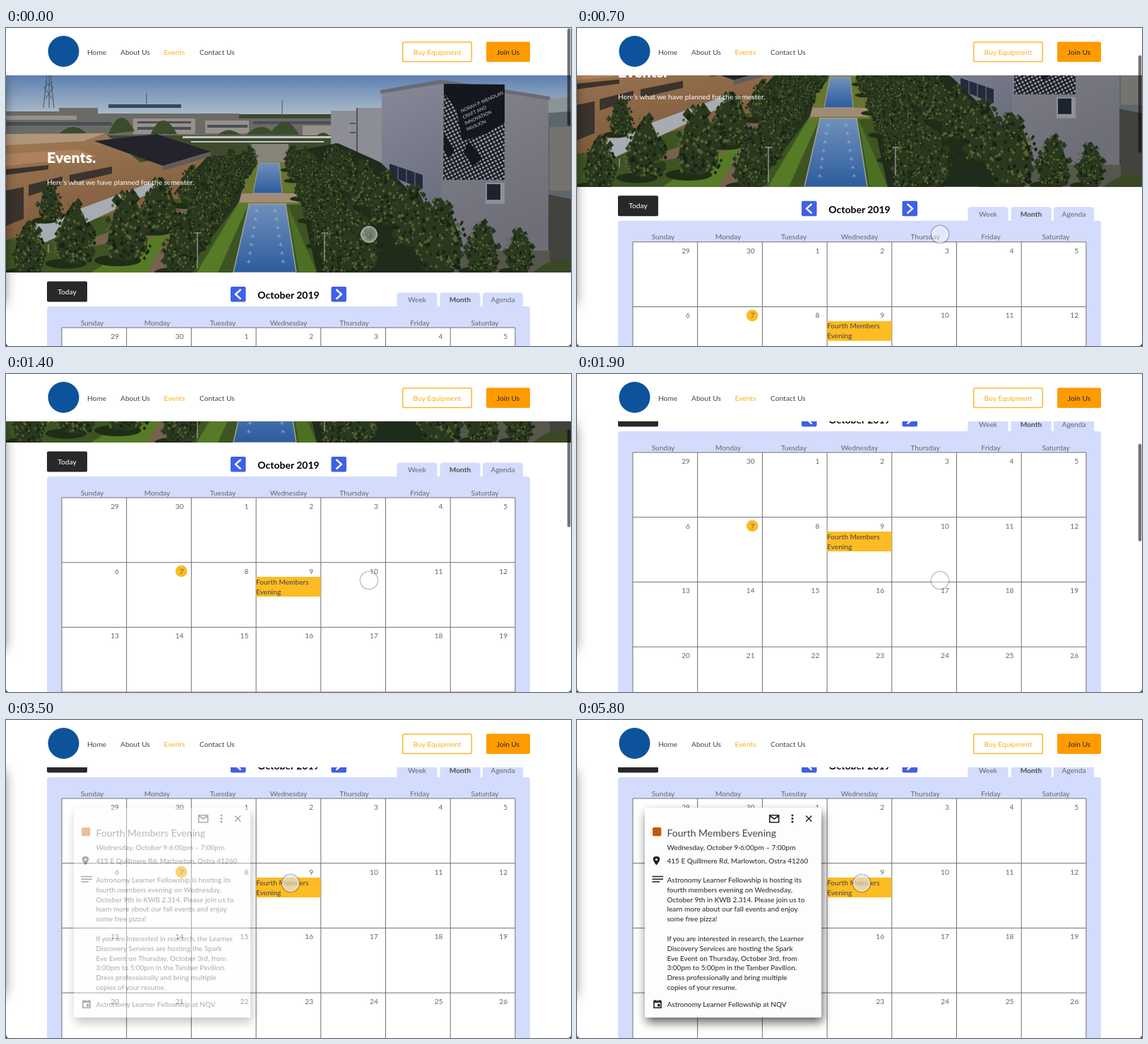
Write an HTML page that moves like this. It is 800 px wide and 450 px high and loops after 5.9 s.

```html
<!DOCTYPE html>
<html lang="en">
<head>
<meta charset="utf-8">
<title>Events</title>
<style>
  @property --scroll { syntax: "<number>"; inherits: true; initial-value: 0; }

  html, body { margin: 0; width: 100%; height: 100%; overflow: hidden; background: #fff; }
  svg { display: block; width: 800px; height: 450px; }
  text { font: 10.2px Lato, "Open Sans", sans-serif; fill: #444; white-space: pre; }
  .mid { text-anchor: middle; }
  .end { text-anchor: end; fill: #666; }
  .grey { fill: #666; }
  .white { fill: #fff; }
  .gold { fill: #fdae1c; }
  .bold { font-weight: 700; fill: #505050; }
  .hero { font-size: 21.3px; font-weight: 900; fill: #fff; }
  .month { font-size: 14px; font-weight: 700; fill: #000; }
  .title { font-size: 14px; }
  .body text:not(.title) { font-size: 10px; font-weight: 500; fill: #333; }
  .sign text { font-size: 6.6px; fill: #c9ccd2; }
  .icon { fill: none; stroke: #222; stroke-width: 1.6; }
  .chevron { fill: none; stroke: #fff; stroke-width: 2.4; }

  /* Every segment advances in 100 ms steps. */
  #stage { animation: scroll 5.9s infinite; }
  #page { transform: translateY(calc(var(--scroll) * -1px)); }
  #bar { transform: translateY(calc(var(--scroll) * .314px)); animation: bar 5.9s infinite; }
  #cursor { animation: move 5.9s step-end infinite; }
  #press { animation: press 5.9s step-end infinite; }
  #popup { animation: appear 5.9s step-end infinite; }

  @keyframes scroll {
    0% { --scroll: 0; animation-timing-function: steps(4, end); }
    6.779% { --scroll: 71; animation-timing-function: steps(5, end); }
    15.254% { --scroll: 154.7; animation-timing-function: steps(5, end); }
    23.728% { --scroll: 249; animation-timing-function: steps(4, end); }
    30.508% { --scroll: 308; animation-timing-function: step-end; }
    32.203%, 100% { --scroll: 313; }
  }
  @keyframes bar {
    0% { opacity: .55; animation-timing-function: step-end; }
    52.54% { opacity: .55; animation-timing-function: steps(3, end); }
    57.62%, 100% { opacity: 0; }
  }
  @keyframes move {
    0% { transform: translate(514px, 292px); }
    35.59% { transform: translate(500px, 284px); }
    37.28% { transform: translate(465px, 265px); }
    38.98% { transform: translate(425px, 243px); }
    40.67% { transform: translate(406px, 233px); }
    42.37%, 100% { transform: translate(403px, 231px); }
  }
  @keyframes press {
    0% { opacity: 0; }
    42.37%, 100% { opacity: .5; }
  }
  @keyframes appear {
    0% { opacity: 0; }
    59.32% { opacity: .38; }
    61.01% { opacity: .8; }
    62.71%, 100% { opacity: 1; }
  }

  #card { filter: drop-shadow(2px 7px 7px rgba(0, 0, 0, .6)); }
  #drawer { filter: drop-shadow(0 0 9px rgba(0, 0, 0, .6)); }
</style>
</head>
<body>
<svg id="stage" viewBox="0 0 800 450">
  <defs>
    <linearGradient id="sky" x2="0" y2="1">
      <stop stop-color="#5d80b2"/><stop offset="1" stop-color="#b3c1c9"/>
    </linearGradient>
    <linearGradient id="pool" x2="0" y2="1">
      <stop stop-color="#6f90ba"/><stop offset="1" stop-color="#2c5c9e"/>
    </linearGradient>
    <linearGradient id="wall" x2=".3" y2="1">
      <stop stop-color="#85858f"/><stop offset="1" stop-color="#6d6e78"/>
    </linearGradient>
    <linearGradient id="side" x2=".2" y2="1">
      <stop stop-color="#888a98"/><stop offset="1" stop-color="#666a7a"/>
    </linearGradient>
    <linearGradient id="brick" x2=".3" y2="1">
      <stop stop-color="#a07a56"/><stop offset="1" stop-color="#785638"/>
    </linearGradient>
    <radialGradient id="glass">
      <stop stop-color="#fff" stop-opacity=".3"/><stop offset=".6" stop-color="#fff" stop-opacity=".4"/>
      <stop offset=".84" stop-color="#fff" stop-opacity=".6"/>
      <stop offset=".88" stop-color="#000" stop-opacity=".3"/><stop offset="1" stop-color="#000" stop-opacity="0"/>
    </radialGradient>
    <pattern id="dots" width="5" height="5" patternUnits="userSpaceOnUse" patternTransform="rotate(-27)">
      <circle cx="2.5" cy="2.5" r="1.7" fill="#9a9fa8"/>
    </pattern>
    <clipPath id="frame"><rect y="67" width="800" height="279"/></clipPath>
  </defs>

  <rect width="800" height="450" fill="#fff"/>

  <g id="page">
    <g clip-path="url(#frame)">
      <rect y="67" width="800" height="60" fill="url(#sky)"/>
      <rect y="122" width="800" height="224" fill="#3f4a2c"/>
      <!-- skyline -->
      <path d="M53 113L58 67M68 113L63 67M56 100L67 84L55 76M65 100L54 84L66 76M61 67V113M391 124V102M199 107V92" fill="none" stroke="#46525f"/>
      <path d="M0 118H75V113H130V121H330V128H462V152H0Z" fill="#6a6b67"/>
      <path d="M145 108H248V113H145Z" fill="#34465c"/>
      <path d="M0 124H100V130H0ZM180 128H268V150H180ZM282 131H344V149H282ZM420 138H460V152H420Z" fill="#96918a"/>
      <path d="M0 133H150V138H0ZM186 132H262V135H186ZM186 140H262V144H186ZM285 137H342V141H285ZM350 132H460V136H350Z" fill="#484f55"/>
      <path d="M75 150Q95 130 115 150ZM145 150Q162 106 182 146ZM205 150Q222 112 242 150ZM300 151Q315 138 332 151ZM340 151Q360 132 376 146Q397 118 415 151ZM435 158Q450 138 462 158Z" fill="#3b4b2d"/>
      <!-- left buildings -->
      <path d="M0 152L140 149L190 190L285 176V230L60 300L0 320Z" fill="url(#brick)"/>
      <path d="M0 150L140 149L110 160L0 166Z" fill="#b0977a"/>
      <path d="M0 178L100 172L130 182L0 195Z" fill="#ad825c"/>
      <path d="M0 230L25 225V270L0 280ZM32 222L80 210V222L32 238ZM0 200L60 194V200L0 208ZM90 208L150 196V206L90 220Z" fill="#3b332d"/>
      <path d="M125 160L213 150L290 175L222 195Z" fill="#22232b"/>
      <path d="M222 195L290 175V182L222 202Z" fill="#625b55"/>
      <path d="M250 153H462V156H250ZM262 160H450V162H262Z" fill="#c3c7c8"/>
      <!-- lawns, paths and water -->
      <path d="M0 300L250 240L346 172H400L450 346H0Z" fill="#3d5422"/>
      <path d="M65 318L230 258L275 250L225 346H125L175 300Z" fill="#77624e"/>
      <path d="M120 346L190 305L235 285L200 346ZM205 280L250 262L270 266L235 290ZM300 346L345 246H330L270 346Z" fill="#567a26"/>
      <path d="M30 283L205 219L222 225L50 306Z" fill="#a7acb2"/>
      <path d="M60 306V318M105 285V300M150 264V285" stroke="#7c7d7c" stroke-width="2"/>
      <path d="M335 186H405L416 250H325Z" fill="#66752f"/>
      <path d="M345 164H400V190H345Z" fill="#858477"/>
      <path d="M328 234H412V247H328Z" fill="#a18b75"/>
      <path d="M358 191H387L391 234H350Z" fill="url(#pool)" stroke="#a5a093"/>
      <path d="M344 249H396L411 346H322Z" fill="url(#pool)" stroke="#a5a093" stroke-width="1.5"/>
      <path d="M398 249L440 346H415Z" fill="#4d6f24"/>
      <path id="spray" fill="none" stroke="#9db9d6" stroke-width=".8"/>
      <!-- right buildings -->
      <path d="M460 117H497V113H532V205H460Z" fill="#8d8e95"/>
      <path d="M497 113V190M487 135H495M487 148H495" stroke="#50535b" stroke-width="2"/>
      <path d="M740 100H800V346H740Z" fill="#5d666b"/>
      <path d="M740 104L800 97V118L740 122Z" fill="#8b9494"/>
      <path d="M770 140H800V230H770Z" fill="#75736f"/>
      <path d="M766 235L800 242V346H766Z" fill="#42423f"/>
      <path d="M532 88L616 75V320L532 245Z" fill="url(#side)"/>
      <path d="M616 75L768 99V318H616Z" fill="url(#wall)"/>
      <path d="M530 88L616 73L770 97V102L616 79L530 93Z" fill="#6a6a74"/>
      <path d="M543 192L590 208V228L543 209Z" fill="#222a3c"/>
      <path d="M555 196V214M567 200V219M579 204V224" stroke="#777a88"/>
      <path d="M620 79L706 80V215H619Z" fill="#14171e"/>
      <path d="M620 92L638 115L646 160L680 150L706 133V215H619Z" fill="url(#dots)"/>
      <path d="M655 160L675 185L661 195L648 177ZM620 150L635 172L628 184L620 172Z" fill="#14171e"/>
      <g class="sign" transform="translate(645 120) rotate(-24)">
        <text>NORAH P. WENDLAN</text>
        <text x="-1" y="9">CRAFT AND</text>
        <text x="-2" y="18">INNOVATION</text>
        <text x="-3" y="27">PAVILION</text>
      </g>
      <path d="M679 219H706V249H679Z" fill="#8f9097"/>
      <path d="M681 221H700V243H681Z" fill="#1b2230"/>
      <path d="M610 315H770V346H610Z" fill="#56564c"/>
      <path d="M715 324V315h4v9h4v-9h4v9h4v-9h4v9" fill="none" stroke="#8d8c8a"/>
      <!-- trees -->
      <path d="M402 175L470 163L530 190L600 258L622 346H440Z" fill="#1f2c1b"/>
      <path d="M348 178L285 182L240 230L268 262L262 335L330 246Z" fill="#26331e"/>
      <g id="trees"></g>
      <path d="M271 340V290M451 330V290M266 290H277M447 290H456" stroke="#a9a89f" stroke-width="1.2"/>
      <path d="M745 346Q780 320 800 330V346Z" fill="#3a4826"/>
    </g>
    <text class="hero" x="58" y="191">Events.</text>
    <text class="white" x="58" y="222">Here’s what we have planned for the semester.</text>

    <rect x="58" y="358.5" width="57" height="29" rx="2" fill="#282828"/>
    <text class="mid white" x="86.5" y="376.5">Today</text>
    <g fill="#3f60e8">
      <rect x="318" y="366" width="21.5" height="21.5" rx="2"/>
      <rect x="460.5" y="366" width="21.5" height="21.5" rx="2"/>
    </g>
    <path class="chevron" d="M332.5 370L325 376.8L332.5 383.5M467.5 370L475 376.8L467.5 383.5"/>
    <text class="mid month" x="400" y="383">October 2019</text>

    <g fill="#d3dcfd">
      <rect x="553.5" y="374.5" width="57" height="30" rx="4"/>
      <rect x="614.5" y="374.5" width="57" height="30" rx="4"/>
      <rect x="675" y="374.5" width="57" height="30" rx="4"/>
      <rect x="58" y="394" width="684" height="500" rx="4"/>
    </g>
    <text class="mid grey" x="582" y="388">Week</text>
    <text class="mid bold" x="643" y="388">Month</text>
    <text class="mid grey" x="703.5" y="388">Agenda</text>
    <g id="calendar"></g>
  </g>

  <rect width="800" height="67" fill="#fff"/>
  <circle cx="81.5" cy="33" r="22" fill="#0d539b"/>
  <text x="115" y="37.5">Home</text>
  <text x="162" y="37.5">About Us</text>
  <text class="gold" x="223.5" y="37.5">Events</text>
  <text x="274" y="37.5">Contact Us</text>
  <rect x="561.7" y="20" width="97.6" height="27.6" rx="2" fill="none" stroke="#fdb62f" stroke-width="1.5"/>
  <text class="mid gold" x="610.5" y="37.5">Buy Equipment</text>
  <rect x="680" y="19.5" width="62" height="28.6" rx="2" fill="#ff9b00"/>
  <text class="mid" x="711" y="37.5" style="fill:#222">Join Us</text>

  <rect id="drawer" x="-40" y="72" width="37" height="318"/>

  <g id="popup" class="body">
    <rect id="card" x="96" y="124" width="250" height="297" rx="2" fill="#fdfdfd"/>
    <g class="icon">
      <path d="M272.8 134.8H285.7V144.7H272.8ZM273 135.5L279.3 140L285.5 135.5"/>
      <path d="M324.3 135.5L332.3 143.5M332.3 135.5L324.3 143.5"/>
      <path d="M106.5 221.5H122M106.5 225.3H122M106.5 229H117"/>
      <path d="M109 397.7H119V407.2H109ZM109 399.5H119M111 396V398M117 396V398"/>
    </g>
    <g fill="#222">
      <circle cx="305" cy="135" r="1.5"/><circle cx="305" cy="139.5" r="1.5"/><circle cx="305" cy="144" r="1.5"/>
      <path d="M112.5 205.5C104.5 196 108 193 112.5 193S120.5 196 112.5 205.5Z"/>
      <rect x="114" y="402" width="3.5" height="3.5"/>
    </g>
    <circle cx="112.5" cy="197.5" r="1.6" fill="#fff"/>
    <rect x="107" y="152" width="12.3" height="12.3" rx="2" fill="#c25a08"/>
    <text class="title" x="127.5" y="164.5">Fourth Members Evening</text>
    <text x="127.5" y="184">Wednesday, October 9·6:00pm – 7:00pm</text>
    <text x="127.5" y="203">415 E Quillmere Rd, Marlowton, Ostra 41260</text>
    <g id="notes"></g>
    <text x="127.5" y="405.5">Astronomy Learner Fellowship at NQV</text>
  </g>

  <g id="cursor">
    <circle id="press" r="12" fill="#b9b7b0"/>
    <circle r="14" fill="url(#glass)"/>
  </g>
  <rect id="bar" x="794.8" y="0.5" width="4.5" height="138" rx="2.2"/>
  <path d="M0 445Q0 450 5 450H0ZM800 445Q800 450 795 450H800Z" fill="#333"/>
</svg>

<script>
  const $ = id => document.getElementById(id);
  const label = (x, y, str, cls = "") => `<text class="${cls}" x="${x}" y="${y}">${str}</text>`;

  // Calendar
  const cell = 91.7, left = 79, top0 = 424, rows = 4;
  const centers = [122, 214, 307, 400, 493, 586, 678];
  const days = ["Sunday", "Monday", "Tuesday", "Wednesday", "Thursday", "Friday", "Saturday"];
  let cal = days.map((day, i) => label(centers[i], 420.5, day, "mid grey")).join("");
  cal += `<rect x="${left}" y="${top0}" width="642" height="450" fill="#fff"/>`;
  let grid = "";
  for (let i = 0; i <= 7; i++) grid += `M${left + i * cell} ${top0}V870`;
  for (let r = 0; r < rows; r++) grid += `M${left} ${top0 + r * cell}H721`;
  cal += `<path d="${grid}" stroke="#707070"/>`;
  cal += `<circle cx="248.2" cy="528" r="8.3" fill="#fdbb22"/>`;
  for (let i = 0; i < rows * 7; i++) {
    const x = left + (i % 7) * cell + 81, y = top0 + Math.floor(i / 7) * cell + 16;
    cal += label(x, y, i < 2 ? 29 + i : i - 1, "end");
  }
  cal += `<rect x="354" y="536" width="91.5" height="28" fill="#fdbc24"/>`;
  cal += label(354, 546.5, "Fourth Members") + label(354, 560.5, "Evening");
  $("calendar").innerHTML = cal;

  // Event details
  $("notes").innerHTML = [
    "Astronomy Learner Fellowship is hosting its",
    "fourth members evening on Wednesday,",
    "October 9th in KWB 2.314. Please join us to",
    "learn more about our fall events and enjoy",
    "some free pizza!",
    "",
    "If you are interested in research, the Learner",
    "Discovery Services are hosting the Spark",
    "Eve Event on Thursday, October 3rd, from",
    "3:00pm to 5:00pm in the Tamber Pavilion.",
    "Dress professionally and bring multiple",
    "copies of your resume."
  ].map((line, i) => label(127.5, 230 + i * 13.83, line)).join("");

  // Trees: rows that grow towards the viewer, given as [x, base, height] at both ends
  let seed = 7;
  const rnd = () => (seed = seed * 16807 % 2147483647) / 2147483647;
  const avenue = (far, near, n) => Array.from({ length: n }, (_, i) => {
    const k = (i / (n - 1)) ** 1.4;
    return far.map((v, j) => v + (near[j] - v) * k);
  });
  // Leaf clumps inside a cone; lean moves them towards the lit or the shaded side
  const leaves = (h, n, size, lean) => {
    let d = "";
    for (let i = 0; i < n; i++) {
      const v = rnd() ** .65, half = h * .32 * Math.sin(.2 + v * 2.2);
      const x = (rnd() * 2 - 1 + lean) * half, y = h * (v * .94 - 1);
      const r = h * size * (.5 + rnd());
      d += `M${(x - r).toFixed(1)} ${y.toFixed(1)}l${r.toFixed(1)} ${(-r * 1.3).toFixed(1)} ${r.toFixed(1)} ${(r * 1.3).toFixed(1)} ${(-r).toFixed(1)} ${r.toFixed(1)}z`;
    }
    return d;
  };
  const tree = ([x, y, h]) => {
    const w = h * .27;
    return `<g transform="translate(${x.toFixed(1)} ${y.toFixed(1)})">
      <ellipse cx="${-w * .5}" cy="${-h * .03}" rx="${w * 1.2}" ry="${h * .08}" fill="#1f2d17"/>
      <path d="M0 ${-h}C${w * .5} ${-h * .9} ${w * 1.1} ${-h * .45} ${w} ${-h * .2}C${w * .7} ${h * .03} ${-w * .7} ${h * .03} ${-w} ${-h * .2}C${-w * 1.1} ${-h * .45} ${-w * .5} ${-h * .9} 0 ${-h}Z" fill="#2a381f"/>
      <path d="${leaves(h, 50, .05, 0)}" fill="#2a381f"/>
      <path d="${leaves(h, 60, .025, .1)}" fill="#172414"/>
      <path d="${leaves(h, 60, .02, -.12)}" fill="#56622f"/></g>`;
  };
  $("trees").innerHTML = [
    ...avenue([345, 200, 34], [248, 348, 82], 7),
    ...avenue([318, 205, 34], [172, 332, 102], 5),
    ...avenue([215, 275, 58], [97, 336, 90], 2),
    ...avenue([62, 274, 54], [32, 348, 76], 2),
    ...avenue([405, 202, 36], [468, 350, 66], 6),
    ...avenue([424, 210, 42], [503, 348, 84], 6),
    ...avenue([465, 218, 54], [615, 346, 106], 6),
    ...avenue([675, 346, 74], [727, 346, 64], 2)
  ].sort((a, b) => a[1] - b[1]).map(tree).join("");

  // Fountains
  let spray = "";
  for (let i = 0; i < 7; i++) {
    const y = 260 + i * 12, gap = 13 + i * 1.9;
    for (const x of [368 - gap, 368 + gap]) spray += `M${x - 3} ${y}l3 -3l3 3M${x} ${y - 4}v5`;
  }
  $("spray").setAttribute("d", spray);
</script>
</body>
</html>
```
